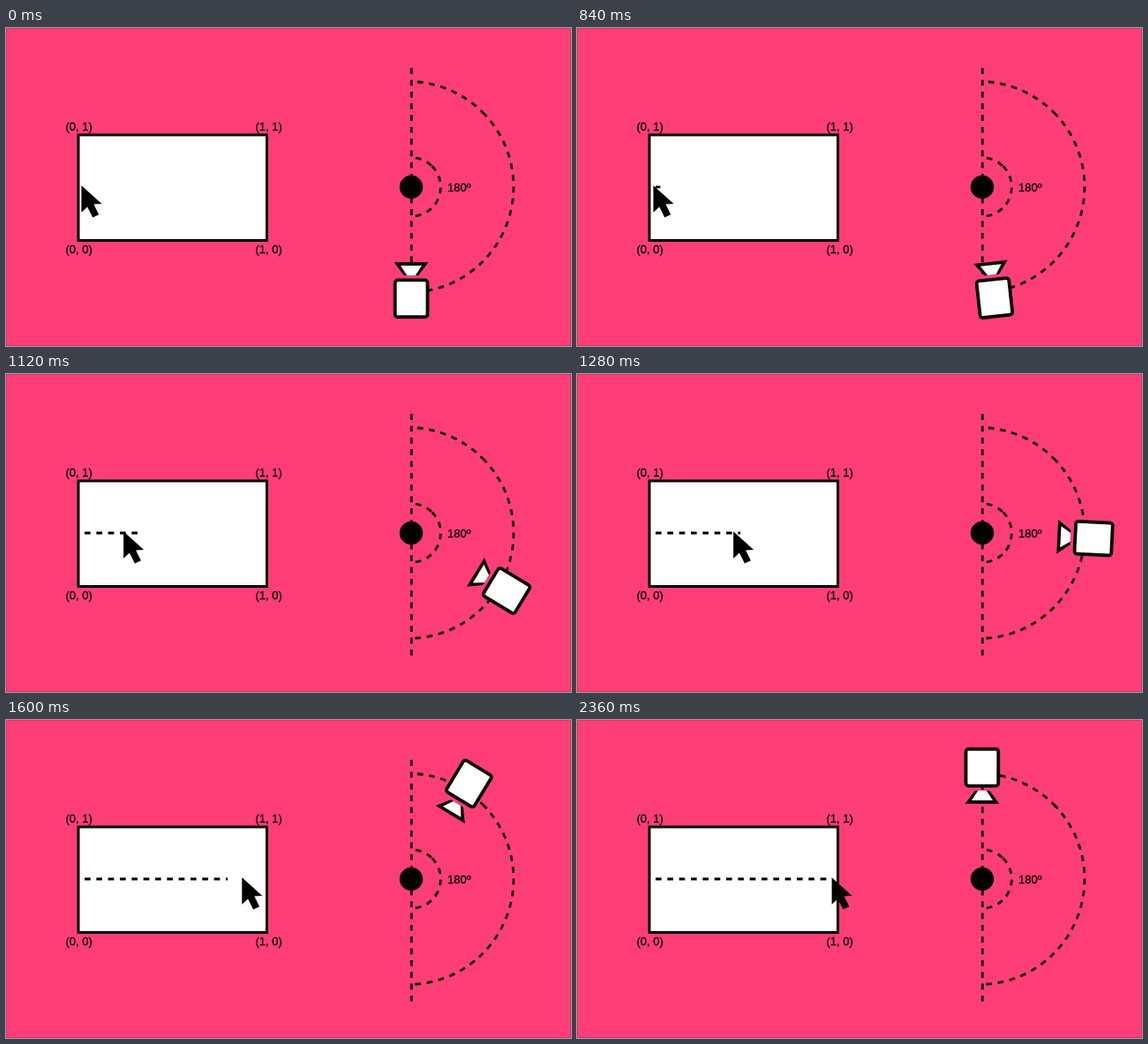
An HTML page for the animation above (2.76 s loop, 640 px wide and 360 px high).

```html
<!DOCTYPE html>
<html lang="en">
<head>
<meta charset="utf-8">
<title>Pointer position to orbit angle</title>
<style>
html, body { margin: 0; width: 100%; height: 100%; overflow: hidden; background: #ff3e78; }
svg { display: block; width: 100vw; height: 100vh; }
text { font: 13px "Liberation Sans", Arial, sans-serif; stroke: #000; stroke-width: .3; }
.dash { fill: none; stroke: #000; stroke-width: 2.8; stroke-dasharray: 6.67 6.66; }
</style>
</head>
<body>
<svg viewBox="0 0 640 360">
  <defs><clipPath id="half"><rect x="462" y="40" width="140" height="280"/></clipPath></defs>
  <rect width="640" height="360" fill="#ff3e78"/>
  <rect x=".5" y=".5" width="639" height="359" fill="none" stroke="#000" stroke-opacity=".15"/>

  <rect x="82" y="121" width="213.5" height="119.5" fill="#fff" stroke="#000" stroke-width="3"/>
  <text x="67.4" y="116">(0, 1)</text>
  <text x="282.4" y="116">(1, 1)</text>
  <text x="67.4" y="254.6">(0, 0)</text>
  <text x="282.4" y="254.6">(1, 0)</text>
  <path id="trail" class="dash"/>
  <path id="pointer" d="M0 0V30.5L6.8 24.3L12.8 36.2L19.8 33L14 21.3L23 20.6Z"/>

  <path class="dash" d="M459.3 45.3V319"/>
  <g clip-path="url(#half)">
    <path id="outer" class="dash"/>
    <path id="inner" class="dash"/>
  </g>
  <circle cx="459" cy="180" r="13.2"/>
  <text x="500" y="185.2">180º</text>

  <g id="camera">
    <path d="M439.6 265.3H478.4L467.3 280H450.7Z"/>
    <path d="M447 269H471L463.8 280H454.2Z" fill="#fff"/>
    <rect x="440.7" y="285.4" width="36.8" height="41.8" rx="3" fill="#fff" stroke="#000" stroke-width="3.8"/>
  </g>
</svg>
<script>
const LOOP = 2760;
const el = id => document.getElementById(id);
const clamp = v => Math.min(1, Math.max(0, v));

const cursorKeys = [[790, 0], [840, .045], [1000, .211], [1280, .468], [1600, .789], [1800, 1]];
const angleKeys = [[807, 0], [840, 6.1], [1000, 37.3], [1280, 87], [1600, 148.6], [1766, 180]];

function at(keys, t) {
  if (t <= keys[0][0]) return keys[0][1];
  for (let i = 1; i < keys.length; i++) {
    const [t0, a] = keys[i - 1], [t1, b] = keys[i];
    if (t <= t1) return a + (b - a) * (t - t0) / (t1 - t0);
  }
  return keys[keys.length - 1][1];
}

// Full circle whose dashes start at the upper right and run clockwise.
function ring(id, cx, cy, r) {
  const d = r * Math.SQRT1_2;
  const a = `${cx + d} ${cy - d}`, b = `${cx - d} ${cy + d}`;
  el(id).setAttribute("d", `M${a}A${r} ${r} 0 0 1 ${b}A${r} ${r} 0 0 1 ${a}`);
}
ring("outer", 455.5, 180, 119.5);
ring("inner", 459.2, 180, 33.2);

function draw(t) {
  const ease = (1 - Math.cos(Math.PI * at(cursorKeys, t))) / 2;
  const end = 89 + 198 * clamp((t - 815) / 960);
  el("pointer").setAttribute("transform", `translate(${85.4 + 203.2 * ease} 178.3)`);
  el("trail").setAttribute("d", end > 89 ? `M89 180H${end}` : "");
  el("camera").setAttribute("transform", `rotate(${-at(angleKeys, t)} 459 180)`);
}

const start = performance.now();
function tick() {
  draw((performance.now() - start) % LOOP);
  requestAnimationFrame(tick);
}
tick();
</script>
</body>
</html>
```
